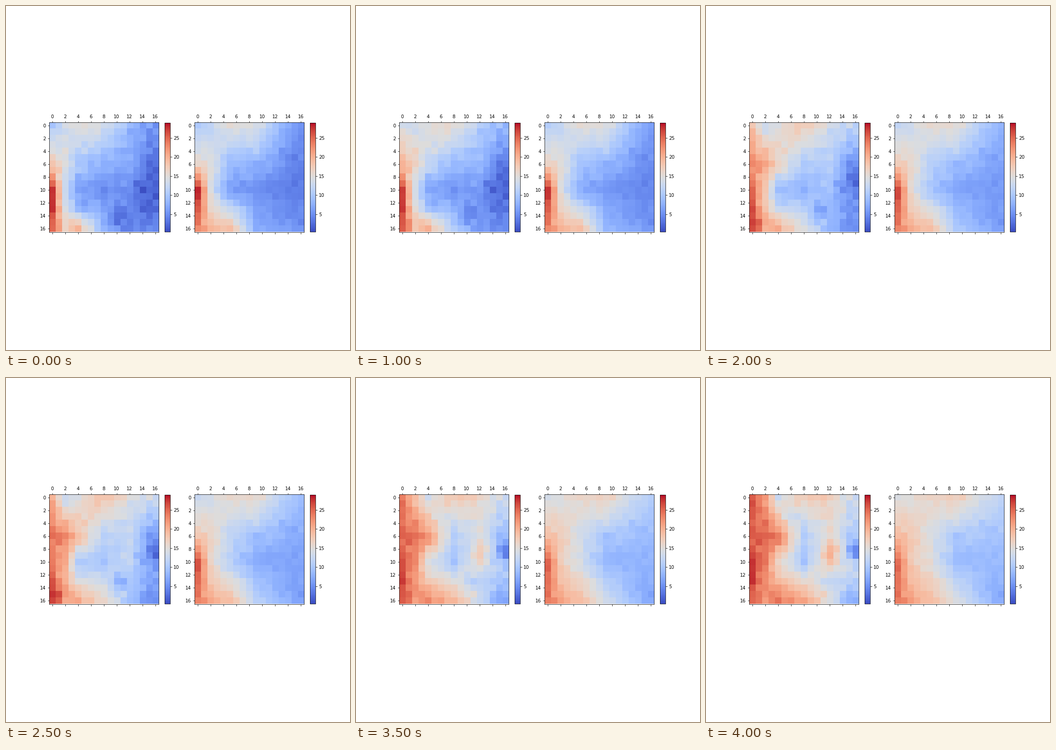
Recreate the animation shown at these times as a matplotlib script. Size 748 by 748 pixels, loop 4500 ms.

```python
import numpy as np
import matplotlib.pyplot as plt
from matplotlib.animation import FuncAnimation

SIZE, DPI, N = 748, 72, 17
FRAMES, STEP_MS = 9, 500
VMIN, VMAX = 0.42, 28.97
CELLS = np.arange(N)
Y, X = np.mgrid[:N, :N]
ROWS = [0, 6, 10, 16]
LEFT_COLS = [0, 2, 4, 8, 12, 15]
RIGHT_COLS = [0, 2, 5, 9, 15]

plt.rcParams.update({"font.family": "DejaVu Sans", "font.size": 10})
rng = np.random.default_rng(4)


def field(cols, knots, spots=()):
    """Spread coarse knots over the grid and add (row, col, height) bumps."""
    wide = np.array([np.interp(CELLS, cols, row) for row in knots])
    grid = np.array([np.interp(CELLS, ROWS, col) for col in wide.T]).T
    for r, c, h in spots:
        grid += h * np.exp(-((Y - r) ** 2 + (X - c) ** 2) / 2)
    return grid


left_start = field(LEFT_COLS,
                   [[10, 13, 15.5, 14, 8.5, 6],
                    [17.5, 14.5, 10, 7.5, 7, 2.8],
                    [28, 12, 6, 5, 4.5, 1.5],
                    [25, 17, 19, 8, 4, 5]],
                   [(13, 4.5, -4), (14.5, 10.3, -3), (13, 14.7, -2)])
left_mid = field(LEFT_COLS,
                 [[20, 12, 15, 19, 14.5, 13.5],
                  [24, 23, 19, 11, 12, 6],
                  [24, 20, 10, 10, 12, 7],
                  [25, 20, 20, 16, 9, 5.5]],
                 [(8.7, 16, -5), (13, 10.5, -3.5), (15, 0.7, 4)])
left_end = field(LEFT_COLS,
                 [[26, 21, 13.5, 18, 17, 13.5],
                  [25, 25, 24, 10.5, 15.5, 10.5],
                  [28, 23.5, 16, 10, 17, 13.5],
                  [25, 22, 23.5, 21, 14, 8]],
                 [(8.5, 16, -9), (8.5, 12.3, 4), (13, 12, -4), (3, 6, -4)])
right_start = field(RIGHT_COLS,
                    [[10.5, 11.5, 15, 14.5, 5.5],
                     [16, 15, 9, 8, 4.5],
                     [28.5, 14, 6, 5.2, 3.5],
                     [23, 19, 19, 7.5, 5.5]])
right_end = field(RIGHT_COLS,
                  [[14.5, 14.5, 16, 17.5, 12],
                   [19, 18, 14.5, 10.3, 10],
                   [25, 17.5, 15, 9, 8.5],
                   [24, 21, 19, 14.5, 7.5]])

left_grain = rng.normal(0, 0.6, (N, N))
right_grain = rng.normal(0, 0.4, (N, N))

# Upper rows warm early, the middle rows late.
EASE = 0.7 + 0.8 * np.exp(-((Y - 10) / 4) ** 2)


def mix(a, b, t):
    return a + (b - a) * t


def left_at(step):
    if step <= 4:
        base = mix(left_start, left_mid, (step / 4) ** EASE)
    else:
        base = mix(left_mid, left_end, (step - 4) / 3)
    return base + left_grain


def right_at(step):
    return mix(right_start, right_end, step / 7) + right_grain


fig = plt.figure(figsize=(SIZE / DPI, SIZE / DPI), dpi=DPI, facecolor="white")


def px_axes(x, y, w, h):
    return fig.add_axes((x / SIZE, 1 - (y + h) / SIZE, w / SIZE, h / SIZE))


def heatmap(x, data):
    ax = px_axes(x, 253.3, 238.2, 238.2)
    im = ax.imshow(data, cmap="coolwarm", vmin=VMIN, vmax=VMAX,
                   interpolation="nearest", aspect="auto")
    ax.set_xticks(range(0, N, 2))
    ax.set_yticks(range(0, N, 2))
    ax.tick_params(axis="x", top=True, bottom=True,
                   labeltop=True, labelbottom=False)
    bar = fig.colorbar(im, cax=px_axes(x + 251.6, 253.8, 11.9, 237.2))
    bar.set_ticks(range(5, 26, 5))
    return im


left = heatmap(93.5, left_at(0))
right = heatmap(409.7, right_at(0))


def update(frame):
    step = max(0, frame - 1)  # the opening state holds twice as long
    left.set_data(left_at(step))
    right.set_data(right_at(step))
    return left, right


anim = FuncAnimation(fig, update, frames=FRAMES, interval=STEP_MS,
                     repeat=True, repeat_delay=0, blit=False)
plt.show()
```
